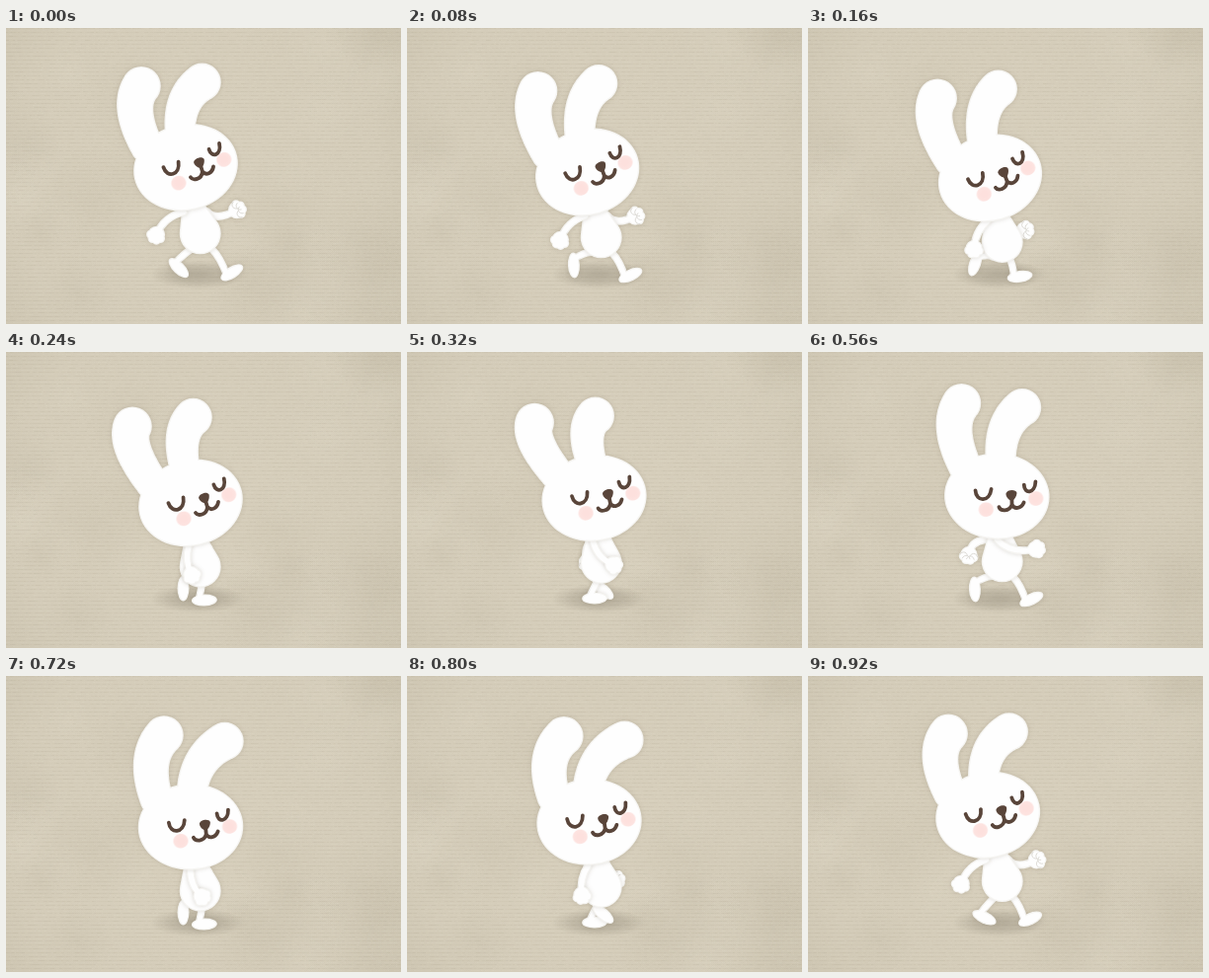
Write an HTML page with a canvas that moves like this. It is 400 px wide and 300 px high and loops after 960 ms.

```html
<!DOCTYPE html>
<html lang="en">
<head>
<meta charset="utf-8">
<title>Walking bunny</title>
<style>
html, body { margin: 0; width: 100%; height: 100%; overflow: hidden; background: #d4ccb9; }
canvas { display: block; width: 400px; height: 300px; }
</style>
</head>
<body>
<canvas id="stage" width="400" height="300"></canvas>
<script>
const W = 400, H = 300, LOOP = 960, STEP = 40, TAU = 2 * Math.PI;
const ctx = document.getElementById('stage').getContext('2d');
const RIM = '#f5f4f1', WHITE = '#fefefe', INK = '#59453a', LINE = '#dad7d2';

// Cosine running n times per loop, with its peak at phase `peak`.
const wave = (p, n, peak) => Math.cos(TAU * n * (p - peak));
const mid = (a, b, dx, dy) => [(a[0] + b[0]) / 2 + dx, (a[1] + b[1]) / 2 + dy];

function rng(seed) {
  return () => (seed = (seed * 16807) % 2147483647) / 2147483647;
}

function makePaper() {
  const cv = document.createElement('canvas');
  cv.width = W; cv.height = H;
  const g = cv.getContext('2d'), rand = rng(41);
  const base = g.createRadialGradient(190, 140, 60, 190, 150, 270);
  base.addColorStop(0, '#d6cebb');
  base.addColorStop(0.6, '#d4ccb9');
  base.addColorStop(1, '#cbc3af');
  g.fillStyle = base;
  g.fillRect(0, 0, W, H);
  for (let i = 0; i < 30; i++) {
    const x = rand() * W, y = rand() * H, r = 20 + rand() * 40;
    const tint = i % 2 ? '255,250,235' : '130,120,96';
    const s = g.createRadialGradient(x, y, 0, x, y, r);
    s.addColorStop(0, `rgba(${tint},.05)`);
    s.addColorStop(1, `rgba(${tint},0)`);
    g.fillStyle = s;
    g.fillRect(x - r, y - r, 2 * r, 2 * r);
  }
  for (let y = 0; y < H; y += 2) {
    for (let x = 0; x < W;) {
      const len = 1 + rand() * 2, a = rand() * 0.08;
      g.fillStyle = y % 4 ? `rgba(255,250,235,${a})` : `rgba(115,104,80,${a})`;
      g.fillRect(x, y, len, 1);
      x += len;
    }
  }
  return cv;
}

// Runs a shape twice: a soft grey rim, then the white inside it.
function soft(shape) {
  [0, 1.3].forEach(inset => {
    ctx.shadowColor = inset ? 'transparent' : 'rgba(130,120,98,.25)';
    ctx.shadowBlur = 4;
    ctx.fillStyle = ctx.strokeStyle = inset ? WHITE : RIM;
    shape(inset);
  });
}

function addDot(path, x, y, r) {
  path.moveTo(x + r, y);
  path.arc(x, y, r, 0, TAU);
}

// Tapered tube that passes through a, m and b.
function addTube(path, a, m, b, r0, r1, inset) {
  for (let u = 0; u <= 1; u += 1 / 32) {
    const v = 1 - u;
    const at = k => v * (v - u) * a[k] + 4 * u * v * m[k] + u * (u - v) * b[k];
    addDot(path, at(0), at(1), r0 + (r1 - r0) * u - inset);
  }
}

function limb(a, c, b, width) {
  ctx.lineWidth = width;
  ctx.beginPath();
  ctx.moveTo(...a);
  ctx.quadraticCurveTo(...c, ...b);
  ctx.stroke();
}

function leg(q, belly) {
  const x = 196 + 29 * wave(q, 1, 0.06) + 6 * wave(q, 2, 0.48);
  const y = 245.5 + 6.5 * wave(q, 1, 0.19);
  const a = (25 + 60 * wave(q, 1, 0.64) + 26 * wave(q, 2, 0.19)) * Math.PI / 180;
  const hip = [belly[0] + 0.35 * (x - belly[0]), belly[1] + 15];
  const ankle = [x - 6 * Math.cos(a), y - 6 * Math.sin(a)];
  soft(inset => {
    limb(hip, mid(hip, ankle, 2, -4), ankle, 7.5 - 2 * inset);
    ctx.beginPath();
    ctx.ellipse(x, y, 13 - inset, 6 - inset, a, 0, TAU);
    ctx.fill();
  });
}

function arm(q, belly, near) {
  const reach = -wave(q, 1, 0.02);
  const x = near ? 193 + 41 * reach : 197 + 37 * reach;
  const y = (near ? 213 : 204) + 8 * wave(q, 1, 0.02) - 11.5 * wave(q, 2, 0);
  const shoulder = [near ? 186 + 6 * reach : 191 + 13 * reach, belly[1] - 22];
  const elbow = mid(shoulder, [x, y], -6, 2 + 9 * reach);
  const a = Math.atan2(y - elbow[1], x - elbow[0]);
  const fingers = [-1.2, -0.4, 0.4, 1.2].map(turn =>
    [x + 5.5 * Math.cos(a + turn), y + 5.5 * Math.sin(a + turn)]);
  soft(inset => {
    limb(shoulder, elbow, [x, y], 8 - 2 * inset);
    const fist = new Path2D();
    addDot(fist, x, y, 8.8 - inset);
    fingers.forEach(f => addDot(fist, ...f, 4.8 - inset));
    ctx.fill(fist);
  });
  if (near) return;
  ctx.strokeStyle = LINE;
  ctx.lineWidth = 0.9;
  fingers.forEach(f => {
    ctx.beginPath();
    ctx.arc(...f, 4, a + 1.8, a + 4.4);
    ctx.stroke();
  });
}

function body(belly, headX) {
  const top = [belly[0] + 0.4 * (headX - belly[0]), belly[1] - 22];
  soft(inset => {
    const path = new Path2D();
    addTube(path, top, mid(top, belly, 0, 0), belly, 13, 21, inset);
    ctx.fill(path);
  });
}

function head(p, x, y) {
  const tilt = (-6.8 - 9 * wave(p, 1, 0.11) + wave(p, 2, -0.04)) * Math.PI / 180;
  const c = Math.cos(tilt), s = Math.sin(tilt);
  const world = (px, py) => [x + px * c - py * s, y + px * s + py * c];

  // Both ears share one sway; the left one also dips as it swings back.
  const sway = 3 * wave(p, 3, 0.5) - 16 * wave(p, 1, 0.26);
  const flop = 4 * wave(p, 2, 0.38);
  const tipL = [x - 43 + sway, y - 85 + 8 * wave(p, 1, 0.2) + flop];
  const tipR = [x + 18.5 + sway, y - 86.5 + flop];
  const rootL = world(-33.5, -29), rootR = world(2.5, -37);

  soft(inset => {
    const path = new Path2D(), rx = 53.3 - inset;
    path.moveTo(x + rx * c, y + rx * s);
    path.ellipse(x, y, rx, 43.8 - inset, tilt, 0, TAU);
    addTube(path, rootL, mid(rootL, tipL, -9, -5), tipL, 17, 19.8, inset);
    addTube(path, rootR, mid(rootR, tipR, -6, -5), tipR, 15.5, 19.3, inset);
    ctx.fill(path);
  });
  ctx.save();
  ctx.translate(x, y);
  ctx.rotate(tilt);
  face();
  ctx.restore();
}

function cheek(x, y) {
  const g = ctx.createRadialGradient(x, y, 3, x, y, 8.5);
  g.addColorStop(0, '#fde0dd');
  g.addColorStop(0.65, '#fde3e0');
  g.addColorStop(1, 'rgba(254,230,228,0)');
  ctx.fillStyle = g;
  ctx.beginPath();
  ctx.ellipse(x, y, 8.5, 7.5, -0.2, 0, TAU);
  ctx.fill();
}

const features = new Path2D(
  'M-22-5C-21 7-7 6.5-6-7' +
  'M27-12.5C27.5-2.5 38.5-4 38.5-16' +
  'M15 0L15.5 8M2.5 11C4 15 13 16 15.5 8C18 13 25 12 27.5 5.5'
);
const nose = new Path2D('M9-3C10-7 19-8 20-4C20 0 17 4 15 4S9 1 9-3Z');

function face() {
  cheek(-10.5, 14);
  cheek(39.5, 1);
  ctx.strokeStyle = ctx.fillStyle = INK;
  ctx.lineWidth = 3.8;
  ctx.stroke(features);
  ctx.fill(nose);
}

function groundShadow() {
  ctx.save();
  ctx.translate(194, 250);
  ctx.scale(1, 0.3);
  const g = ctx.createRadialGradient(0, 0, 4, 0, 0, 48);
  g.addColorStop(0, 'rgba(88,80,64,.26)');
  g.addColorStop(0.5, 'rgba(88,80,64,.17)');
  g.addColorStop(1, 'rgba(88,80,64,0)');
  ctx.fillStyle = g;
  ctx.fillRect(-48, -48, 96, 96);
  ctx.restore();
}

const paper = makePaper();
ctx.lineCap = ctx.lineJoin = 'round';

// Opposite limbs run half a loop apart; head and belly bob once per step.
function draw(p) {
  const bob = -wave(p, 2, -0.03);
  const headX = 187 - 5 * wave(p, 1, 0);
  const belly = [196.7, 213 + 5 * bob];
  ctx.drawImage(paper, 0, 0);
  groundShadow();
  arm(p + 0.5, belly, false);
  leg(p + 0.5, belly);
  leg(p, belly);
  body(belly, headX);
  arm(p, belly, true);
  head(p, headX, 147 + 6.3 * bob);
}

const start = performance.now();
function tick() {
  const t = (performance.now() - start) % LOOP;
  draw(Math.floor(t / STEP) * STEP / LOOP);
  requestAnimationFrame(tick);
}
tick();
</script>
</body>
</html>
```
